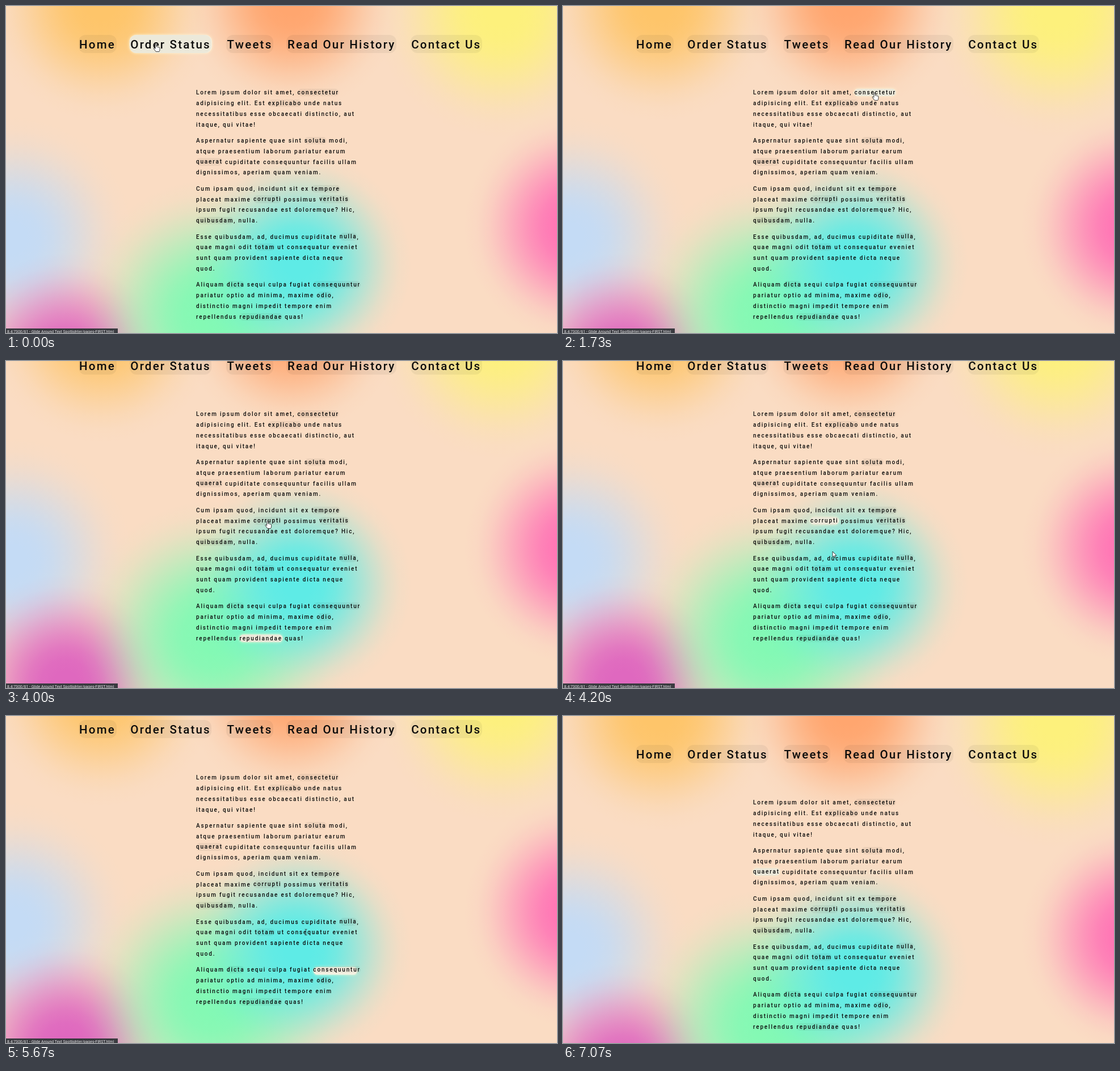
Recreate the animation shown at these times as an HTML page. Size 971 by 577 pixels, loop 8070 ms.

```html
<!DOCTYPE html>
<html lang="en">
<head>
<meta charset="utf-8">
<title>Link highlighter</title>
<style>
  html, body { margin: 0; width: 100%; height: 100%; overflow: hidden; background: #fadcc3; }
  #stage { position: relative; width: 971px; height: 577px; overflow: hidden; }
  #page { position: absolute; left: 0; top: 0; width: 971px; height: 636px;
    color: #0b0b0b; font: 500 10px Roboto, sans-serif; letter-spacing: 1.81px; }
  #glow { position: absolute; left: 0; top: 0; border-radius: 12px; background: #f9f5e6;
    box-shadow: 0 0 5px #fff7d6; }
  .nav, p { position: absolute; margin: 0; white-space: pre; }
  .link { background: rgba(0, 0, 0, .05); border-radius: 12px; padding: 1.1px 0; }
  .nav { top: 51px; padding: 5.4px 1.6px 3px; font-size: 20.5px; line-height: 24px; letter-spacing: 2.2px; }
  p { left: 335px; width: 292px; line-height: 18.85px; }
  #status { position: absolute; left: 0; top: 569px; width: 195px; height: 8px; padding-left: 2px;
    overflow: hidden; white-space: pre; background: #3a3b40; color: #e4e4e6;
    font: 6.9px/12px Roboto, sans-serif; }
  #cursor { position: absolute; left: 0; top: 0; overflow: visible; }
  #cursor path { fill: #fff; stroke: #111; stroke-width: .8; stroke-linejoin: round; }
  #cursor #beam { fill: none; stroke: #333; }
</style>
</head>
<body>
<div id="stage">
  <div id="page"><div id="glow"></div></div>
  <div id="status">8.4:7300/61 - Glide Around Text Spotlighter/pages-FIRST.html</div>
  <svg id="cursor" width="1" height="1">
    <path id="hand" d="M-1 1Q0-.8 1.2 1V5Q2.6 4 3.2 5.5Q4.6 4.6 5.2 6Q7 5.6 7 7.5V10Q7 12 5.8 13.5H.2L-3.6 8.4Q-4 6.8-2.5 7L-1 8.4Z"/>
    <path id="arrow" d="M0 0V10L2.3 7.9L3.9 11.4L5.4 10.7L3.9 7.3H7Z"/>
    <path id="beam" d="M-2-5H2M0-5V5M-2 5H2"/>
  </svg>
</div>
<script>
const LOOP = 8070, STEP = 200 / 3, GLIDE = 200;
const $ = id => document.getElementById(id);
const page = $('page'), glow = $('glow');

const nav = [['Home', 127.5], ['Order Status', 217.7], ['Tweets', 388], ['Read Our History', 494.3], ['Contact Us', 712.7]];
const paragraphs = [
`Lorem ipsum dolor sit amet, *consectetur*
adipisicing elit. Est *explicabo* unde natus
necessitatibus esse obcaecati distinctio, aut
itaque, qui vitae!`,
`Aspernatur sapiente quae sint *soluta* modi,
atque praesentium laborum pariatur earum
*quaerat* cupiditate consequuntur facilis ullam
dignissimos, aperiam quam veniam.`,
`Cum ipsam quod, incidunt sit ex *tempore*
placeat maxime *corrupti* possimus *veritatis*
ipsum fugit recusandae est doloremque? Hic,
*quibusdam*, nulla.`,
`Esse quibusdam, ad, ducimus cupiditate *nulla*,
quae magni odit *totam* ut consequatur eveniet
sunt quam provident sapiente dicta neque
quod.`,
`Aliquam *dicta* sequi culpa fugiat *consequuntur*
pariatur optio ad minima, maxime *odio*,
distinctio magni impedit tempore enim
repellendus *repudiandae* quas!`];

page.insertAdjacentHTML('beforeend',
  nav.map(([word, x]) => `<span class="nav link" style="left:${x}px">${word}</span>`).join('') +
  paragraphs.map((text, i) => `<p style="top:${144 + 84.85 * i}px">` +
    text.replace(/\*(\w+)\*/g, '<span class="link">$1</span>') + '</p>').join(''));

// Soft colour spots, topmost first: x, y, radius, colour
const spots = [
  [515, 455, 200, '#5eebe6'], [365, 545, 240, '#84f9b4'], [105, 630, 195, '#df68bf'], [10, 410, 215, '#c4dbf5'],
  [1012, 390, 205, '#ff74b5'], [872, 8, 225, '#fdf17c'], [502, -8, 195, '#ffa66f'], [168, -2, 205, '#fec56a']];

// Opacity falls along a smooth cosine from the core to the rim
const fade = color => Array.from({ length: 9 }, (_, i) => {
  const alpha = Math.round(127.5 * (1 + Math.cos(Math.PI * i / 8)));
  return `${color}${alpha.toString(16).padStart(2, '0')} ${12 + 11 * i}%`;
});
page.style.background = spots.map(([x, y, r, color]) =>
  `radial-gradient(circle ${r}px at ${x}px ${y}px,${fade(color)})`).join() + ',#fadcc3';

const boxOf = el => {
  const r = el.getBoundingClientRect();
  return [r.left, r.top, r.width, r.height];
};
const links = {};
for (const el of document.querySelectorAll('.link')) links[el.textContent] = boxOf(el);
const blocks = [...document.querySelectorAll('p')].map(boxOf);

// Pointer stops: time and either a link, which lights up, or a free point
const stops = [
  [-GLIDE, 'Order Status'], [0, 264, 67], [70, 264, 67],
  [250, 'Tweets'], [450, 'Read Our History'], [750, 'Contact Us'], [1330, 'Contact Us'],
  [1480, 'consectetur'], [1730, 'consectetur'], [1880, 'explicabo'], [2200, 'explicabo'],
  [2420, 'quaerat'], [2670, 420, 310], [2870, 420, 310], [3200, 494, 357],
  [3420, 'consequuntur'], [3600, 'repudiandae'], [4000, 'corrupti'], [4200, 475, 336], [4800, 475, 336],
  [5060, 'totam'], [5300, 'odio'], [5545, 'consequuntur'], [5670, 527, 380],
  [6027, 'explicabo'], [6067, 484, 158], [6240, 'consectetur'], [6530, 500, 163],
  [6780, 'quaerat'], [7010, 62, 577], [7066, 45, 600]];
const statusShown = [[0, 2400], [3800, 4300], [5300, 5900]];

const clamp = v => Math.min(1, Math.max(0, v));
const mix = (a, b, p) => a.map((v, i) => v + (b[i] - v) * p);
const scrollAt = t => 59 * (clamp((t - 3800) / 180) - clamp((t - 5621) / 180));

const hops = stops.filter(stop => stop.length === 2);
const path = stops.map(([t, x, y]) => {
  if (y !== undefined) return [t, x, y];
  const [left, top, w, h] = links[x];
  return [t, left + w / 2, top + h / 2 - scrollAt(t)];
});

function pointerAt(t) {
  const i = path.findIndex(stop => stop[0] > t);
  if (i < 0) return path[path.length - 1];
  const a = path[i - 1], b = path[i];
  return mix(a, b, (t - a[0]) / (b[0] - a[0]));
}

// cubic-bezier(.25, .1, .25, 1)
function ease(x) {
  if (x >= 1) return 1;
  let lo = 0, hi = 1, s;
  for (let i = 0; i < 20; i++) {
    s = (lo + hi) / 2;
    if (.75 * s * (1 - s) + s ** 3 < x) lo = s; else hi = s;
  }
  return .3 * s * (1 - s) ** 2 + 3 * s * s * (1 - s) + s ** 3;
}

function glowAt(t) {
  let box = links[hops[0][1]];
  hops.forEach(([start, word], i) => {
    if (t < start) return;
    const end = i + 1 < hops.length ? Math.min(t, hops[i + 1][0]) : t;
    box = mix(box, links[word], ease((end - start) / GLIDE));
  });
  return box;
}

const within = (x, y) => ([l, t, w, h]) => x >= l && x <= l + w && y >= t && y <= t + h;

function draw(t) {
  const scroll = scrollAt(t);
  page.style.transform = `translateY(${-scroll}px)`;

  const [x, y, w, h] = glowAt(t);
  glow.style.cssText = `transform:translate(${x}px,${y}px);width:${w}px;height:${h}px`;

  $('status').hidden = !statusShown.some(([from, to]) => t >= from && t < to);

  const [, cx, cy] = pointerAt(t), over = within(cx, cy + scroll);
  const kind = Object.values(links).some(over) ? 'hand' : blocks.some(over) ? 'beam' : 'arrow';
  for (const id of ['hand', 'arrow', 'beam']) $(id).style.display = id === kind ? '' : 'none';
  $('cursor').style.transform = `translate(${cx}px,${cy}px)`;
}

const begin = performance.now();
function tick() {
  const t = (performance.now() - begin) % LOOP;
  draw(Math.floor((t + 5) / STEP) * STEP);
  requestAnimationFrame(tick);
}
tick();
</script>
</body>
</html>
```
